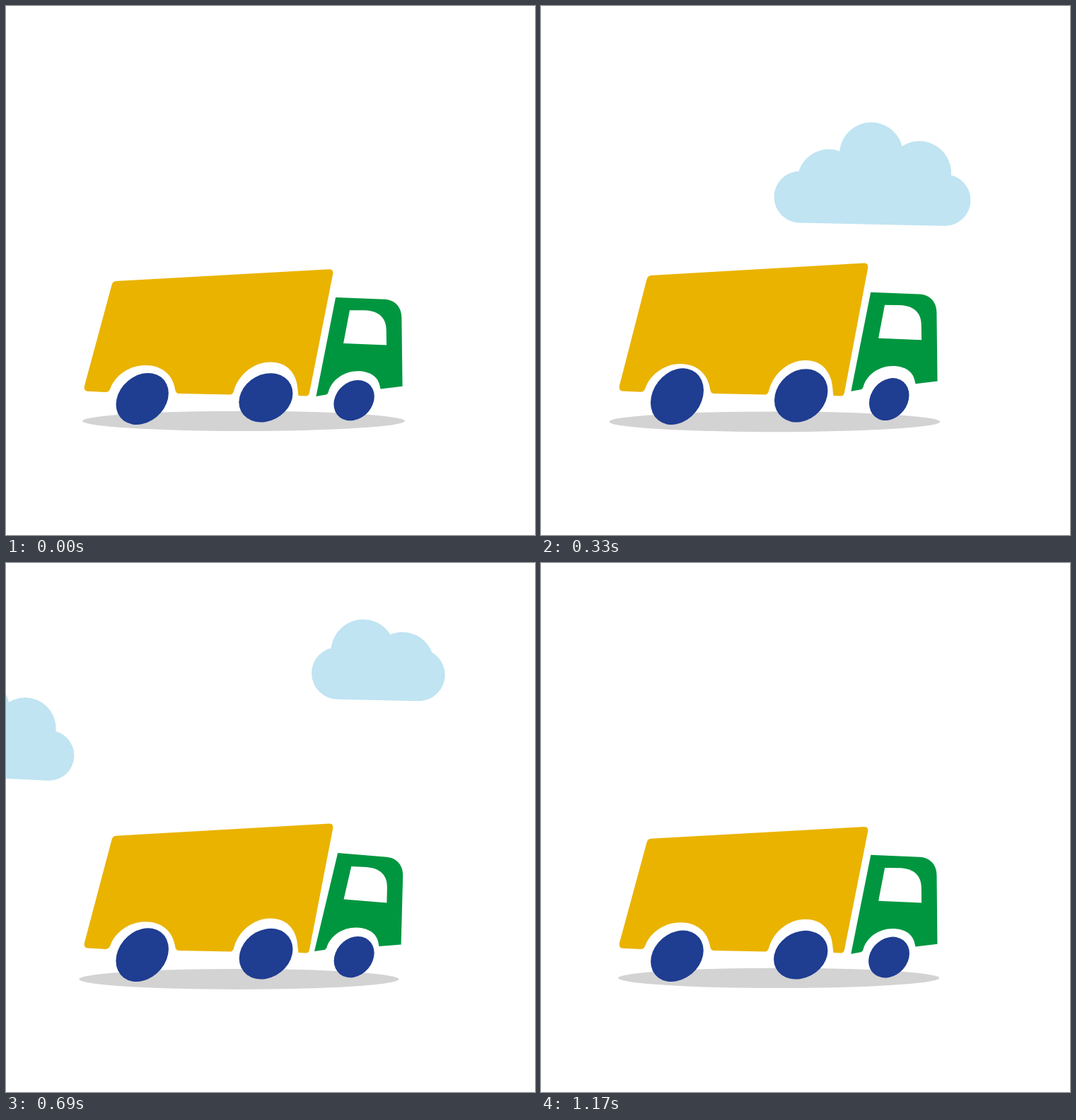
Animation, 748 px wide and 748 px high, one loop 1200 ms. Source, as an HTML page with a canvas:

```html
<!DOCTYPE html>
<html lang="en">
<head>
<meta charset="utf-8">
<title>Truck</title>
<style>
html, body { margin: 0; width: 100%; height: 100%; overflow: hidden; background: #fff; }
canvas { display: block; }
</style>
</head>
<body>
<canvas id="stage" width="748" height="748"></canvas>
<script>
const ctx = document.getElementById('stage').getContext('2d');
const LOOP = 1200, STEP = 30, TAU = 2 * Math.PI;
const YELLOW = '#eab300', GREEN = '#009640', BLUE = '#1f3d91';
const GREY = '#d3d3d3', SKY = '#c0e4f2';

const bodyPath = new Path2D(
  'M111 537 L149.5 394 Q150.7 389 155.5 388.5 L457 371.7 Q463 371.5 462.3 378 ' +
  'L429 547 Q428 551.5 424 551.5 L413.5 551 L412.5 543 ' +
  'C411.5 520 398 503.3 374 503.3 C350 503.3 329 521 322.5 543 Q321 549.5 317 549.5 ' +
  'L244 548 Q240 547.5 239.3 543 C236 521 220 508 197 508 ' +
  'C174 508 154 523 147.5 541 Q145.5 546 141 546 L115 544.7 Q109.5 544 111 537 Z');
const cabPath = new Path2D(
  'M465.5 412 L535 414.3 C550 415 559 426 559 440 L561 537 L530 541 L528.8 536 ' +
  'C526 523 514 516 498 516 C478 516 461 529 456.5 545 Q455.5 549 453 549.7 L439 552.3 Z ' +
  'M485.5 430 L507 430 C527 430.5 537.5 441 537.5 458 L538 479 L477 477 Z');

// Lobes are [x, y, radius] around the tallest one; first and last form the base.
const wideCloud = [[-101, 60.5, 36.5], [-60, 37.5, 44.5], [0, 0, 45], [68, 26.5, 45], [104, 65, 36.5]];
const smallCloud = [[-36, 30, 36.5], [0, 0, 45], [55, 17.5, 44.3], [78, 33.5, 36.5]];

const radians = degrees => degrees * Math.PI / 180;

// One slow swing per loop: 1 at the peak time, -1 half a loop later.
const swing = (t, peak) => Math.cos(TAU * (t - peak) / LOOP);

// Suspension, twice per loop: 0 when settled, 1 when fully raised.
function bounce(t) {
  const phase = (t + 25) / (LOOP / 2) % 1;
  return 1 - Math.abs(1 - 2 * phase);
}

// Ellipse given by its bounding box; lean tilts its long axis to the upper right.
function oval(left, right, top, bottom, color, lean = 0) {
  const rx = (right - left) / 2, ry = (bottom - top) / 2;
  ctx.save();
  ctx.transform(rx, -ry * lean, 0, ry * Math.sqrt(1 - lean * lean), left + rx, top + ry);
  ctx.beginPath();
  ctx.arc(0, 0, 1, 0, TAU);
  ctx.restore();
  ctx.fillStyle = color;
  ctx.fill();
}

function cloud(lobes, x, y, degrees, scale) {
  const first = lobes[0], last = lobes[lobes.length - 1];
  ctx.save();
  ctx.translate(x, y);
  ctx.rotate(radians(degrees));
  ctx.scale(scale, scale);
  ctx.fillStyle = SKY;
  ctx.beginPath();
  for (const [cx, cy, r] of lobes) {
    ctx.moveTo(cx + r, cy);
    ctx.arc(cx, cy, r, 0, TAU);
  }
  // The core runs clockwise like the arcs, so overlaps stay filled.
  ctx.moveTo(first[0], first[1]);
  for (const [cx, cy] of lobes) ctx.lineTo(cx, cy);
  ctx.lineTo(last[0], last[1] + last[2]);
  ctx.lineTo(first[0], first[1] + first[2]);
  ctx.closePath();
  ctx.fill();
  ctx.restore();
}

function drawClouds(t) {
  const a = t - 330, b = t - 840;
  cloud(wideCloud, 467 - 1.404 * a, 209.5 - 0.008 * a, 0.004 * a, 1 - 0.00008 * a);
  cloud(smallCloud, 303 - 1.346 * b, 126.5 + 0.0085 * b, 0.0035 * b, 1 - 0.00006 * b);
}

function drawShadow(t, lift) {
  const sink = 1 - swing(t, 0);
  oval(109.5 - 16 * lift, 557 + 10 * lift + 6 * swing(t, 0),
       572.7 + 0.7 * sink, 601 + sink, GREY);
}

function drawBody(lift) {
  const floor = 550, restTop = 372;
  const top = 373.5 - 12 * lift;
  ctx.save();
  ctx.translate(0, floor);
  ctx.scale(1, (floor - top) / (floor - restTop));
  ctx.translate(0, -floor);
  ctx.fillStyle = YELLOW;
  ctx.fill(bodyPath);
  ctx.restore();
}

function drawCab(t, lift) {
  const pivotX = 439, pivotY = 490;
  ctx.save();
  ctx.translate(pivotX, pivotY + 0.6 - 10 * lift);
  ctx.rotate(radians(1.4 * (1 + swing(t, 760))));
  ctx.translate(-pivotX, -pivotY);
  ctx.fillStyle = GREEN;
  ctx.fill(cabPath, 'evenodd');
  ctx.restore();
}

function drawWheels(t, lift) {
  const swell = Math.max(0, swing(t, 960));
  oval(157 - 2.5 * lift - 4 * swell, 230 - 0.5 * swell, 519.7 - 9 * lift, 592, BLUE, 0.22);
  oval(330 - 2 * swell, 405.5, 520 - 8.3 * lift, 588.5, BLUE, 0.18);
  oval(464 - 2 * swell, 520.5 + swell, 531 - 6 * lift - 5 * swell, 586 + swell, BLUE, 0.19);
}

function render(now) {
  const t = Math.floor(now % LOOP / STEP) * STEP;
  const lift = bounce(t);
  ctx.fillStyle = '#fff';
  ctx.fillRect(0, 0, 748, 748);
  drawClouds(t);
  drawShadow(t, lift);
  drawBody(lift);
  drawCab(t, lift);
  drawWheels(t, lift);
}

function loop() {
  render(performance.now());
  requestAnimationFrame(loop);
}
loop();
</script>
</body>
</html>
```
